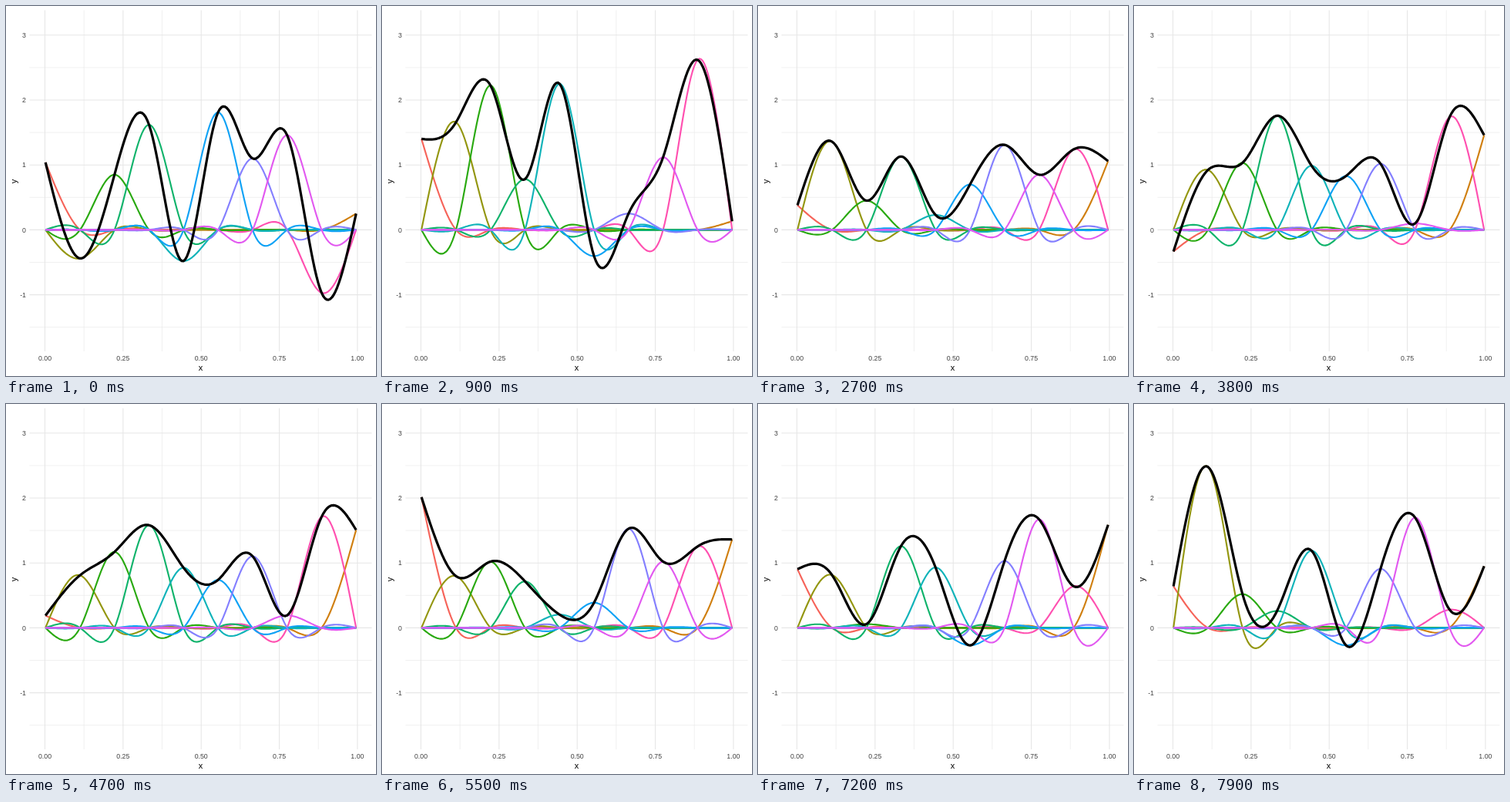
These frames come from a looping animation (480x480 px, 8000 ms). An HTML page:

```html
<!DOCTYPE html>
<html lang="en">
<head>
<meta charset="utf-8">
<title>Spline basis</title>
<style>
html, body { margin: 0; width: 100%; height: 100%; overflow: hidden; background: #fff; }
svg { display: block; width: 480px; height: 480px; }
text { font-family: "Liberation Sans", Arial, sans-serif; text-anchor: middle; }
.tick { font-size: 8.8px; fill: #404040; }
.tick.left { text-anchor: end; }
.title { font-size: 11px; fill: #000; }
.grid { stroke: #e6e6e6; }
.curve { fill: none; stroke-linejoin: round; }
</style>
</head>
<body>
<svg id="plot" viewBox="0 0 480 480"></svg>
<script>
const LOOP = 8000, STEP = 100;
const KNOTS = 10, SAMPLES = 180;
const svg = document.getElementById('plot');

const range = (n, f) => Array.from({ length: n }, (_, i) => f(i));
const axisX = v => 50.5 + 405.4 * v;
const axisY = v => 290.4 - 84.2 * v;
const curveX = s => 51.2 + 403 * s;

// Turning points of the motion: time in ms and the height at each knot.
const poses = [
  { at: 0, y: [1.04, -.44, .85, 1.62, -.48, 1.81, 1.1, 1.46, -.97, .25] },
  { at: 1000, y: [1.41, 1.71, 2.26, .76, 2.32, -.46, .23, 1.11, 2.71, .13] },
  { at: 2700, y: [.38, 1.36, .45, 1.13, .23, .7, 1.31, .85, 1.24, 1.06] },
  { at: 4320, y: [-.55, .79, 1.21, 1.95, 1.22, .87, .93, -.13, 1.89, 1.58] },
  { at: 5380, y: [2.04, .86, 1.07, .66, .19, .41, 1.54, 1, 1.26, 1.33] },
  { at: 6430, y: [1.21, -1.12, -.48, 2.42, .63, -.27, 1.17, 1.64, 1.06, 2.33] },
  { at: 7900, y: [.64, 2.48, .52, .26, 1.19, -.27, .91, 1.7, .28, .95] }
];

// Evenly spaced hues of equal lightness and chroma (polar CIELUV), slightly darkened.
function hueColor(degrees) {
  const L = 65, C = 100, h = degrees * Math.PI / 180;
  const Y = ((L + 16) / 116) ** 3;
  const u = C * Math.cos(h) / (13 * L) + .1978;
  const v = C * Math.sin(h) / (13 * L) + .4683;
  const X = 9 * Y * u / (4 * v), Z = Y * (12 - 3 * u - 20 * v) / (4 * v);
  const rgb = [
    3.2405 * X - 1.5371 * Y - .4985 * Z,
    -.9693 * X + 1.876 * Y + .0416 * Z,
    .0556 * X - .204 * Y + 1.0572 * Z
  ].map(c => {
    const light = c > .0031 ? 1.055 * c ** (1 / 2.4) - .055 : 0;
    return Math.round(255 * Math.min(1, Math.max(.06, light ** 1.22)));
  });
  return `rgb(${rgb})`;
}

// Hues follow the alphabetical order of the names 1, 10, 2, 3 ... 9.
const names = range(KNOTS, k => String(k + 1)).sort();
const knotColor = k => hueColor(15 + 360 / KNOTS * names.indexOf(String(k + 1)));

function add(tag, attrs, text) {
  const el = document.createElementNS('http://www.w3.org/2000/svg', tag);
  for (const k in attrs) el.setAttribute(k, attrs[k]);
  if (text) el.textContent = text;
  svg.appendChild(el);
  return el;
}

const addCurve = (stroke, width) => add('path', { class: 'curve', stroke, 'stroke-width': width });

function gridLine(pos, vertical, major) {
  const d = vertical ? `M${pos} 5.5V448` : `M30.5 ${pos}H474.5`;
  add('path', { d, class: 'grid', 'stroke-width': major ? 1.07 : .6 });
}

function drawAxes() {
  for (const major of [false, true]) {
    for (let i = major ? 0 : 1; i <= 8; i += 2) gridLine(axisX(i / 8), true, major);
    for (let v = major ? -1 : -1.5; v <= 3; v++) gridLine(axisY(v), false, major);
  }
  for (let i = 0; i <= 4; i++) {
    add('text', { x: axisX(i / 4), y: 460.2, class: 'tick' }, (i / 4).toFixed(2));
  }
  for (let v = -1; v <= 3; v++) {
    add('text', { x: 26, y: axisY(v) + 3.2, class: 'tick left' }, String(v));
  }
  add('text', { x: 252.6, y: 473, class: 'title' }, 'x');
  add('text', { transform: 'translate(13.6 227.6) rotate(-90)', class: 'title' }, 'y');
}

// Second derivatives of the natural cubic spline through y, unit spacing.
function bends(y) {
  const n = y.length, c = Array(n).fill(0), d = Array(n).fill(0), m = Array(n).fill(0);
  for (let i = 1; i < n - 1; i++) {
    const w = 4 - c[i - 1];
    c[i] = 1 / w;
    d[i] = (6 * (y[i - 1] - 2 * y[i] + y[i + 1]) - d[i - 1]) / w;
  }
  for (let i = n - 2; i > 0; i--) m[i] = d[i] - c[i] * m[i + 1];
  return m;
}

function splinePath(y) {
  const m = bends(y);
  return 'M' + range(SAMPLES + 1, j => {
    const s = j / SAMPLES, u = s * (KNOTS - 1);
    const i = Math.min(Math.floor(u), KNOTS - 2);
    const b = u - i, a = 1 - b;
    const v = a * y[i] + b * y[i + 1] + ((a ** 3 - a) * m[i] + (b ** 3 - b) * m[i + 1]) / 6;
    return curveX(s).toFixed(2) + ' ' + axisY(v).toFixed(2);
  }).join('L');
}

function heightsAt(t) {
  const i = Math.max(1, poses.findIndex(p => p.at >= t));
  const from = poses[i - 1], to = poses[i];
  const e = .5 - .5 * Math.cos(Math.PI * (t - from.at) / (to.at - from.at));
  return from.y.map((v, k) => v + (to.y[k] - v) * e);
}

drawAxes();
const curves = [0, 9, 8, 1, 2, 3, 4, 5, 6, 7].map(knot => ({ knot, el: addCurve(knotColor(knot), 2.13) }));
const total = addCurve('#000', 3.2);

function draw(t) {
  const h = heightsAt(t);
  for (const { knot, el } of curves) {
    el.setAttribute('d', splinePath(h.map((v, k) => k === knot ? v : 0)));
  }
  total.setAttribute('d', splinePath(h));
}

const start = performance.now();
let shown = -1;
function tick() {
  const t = Math.floor((performance.now() - start) % LOOP / STEP) * STEP;
  if (t !== shown) draw(shown = t);
  requestAnimationFrame(tick);
}
tick();
</script>
</body>
</html>
```
